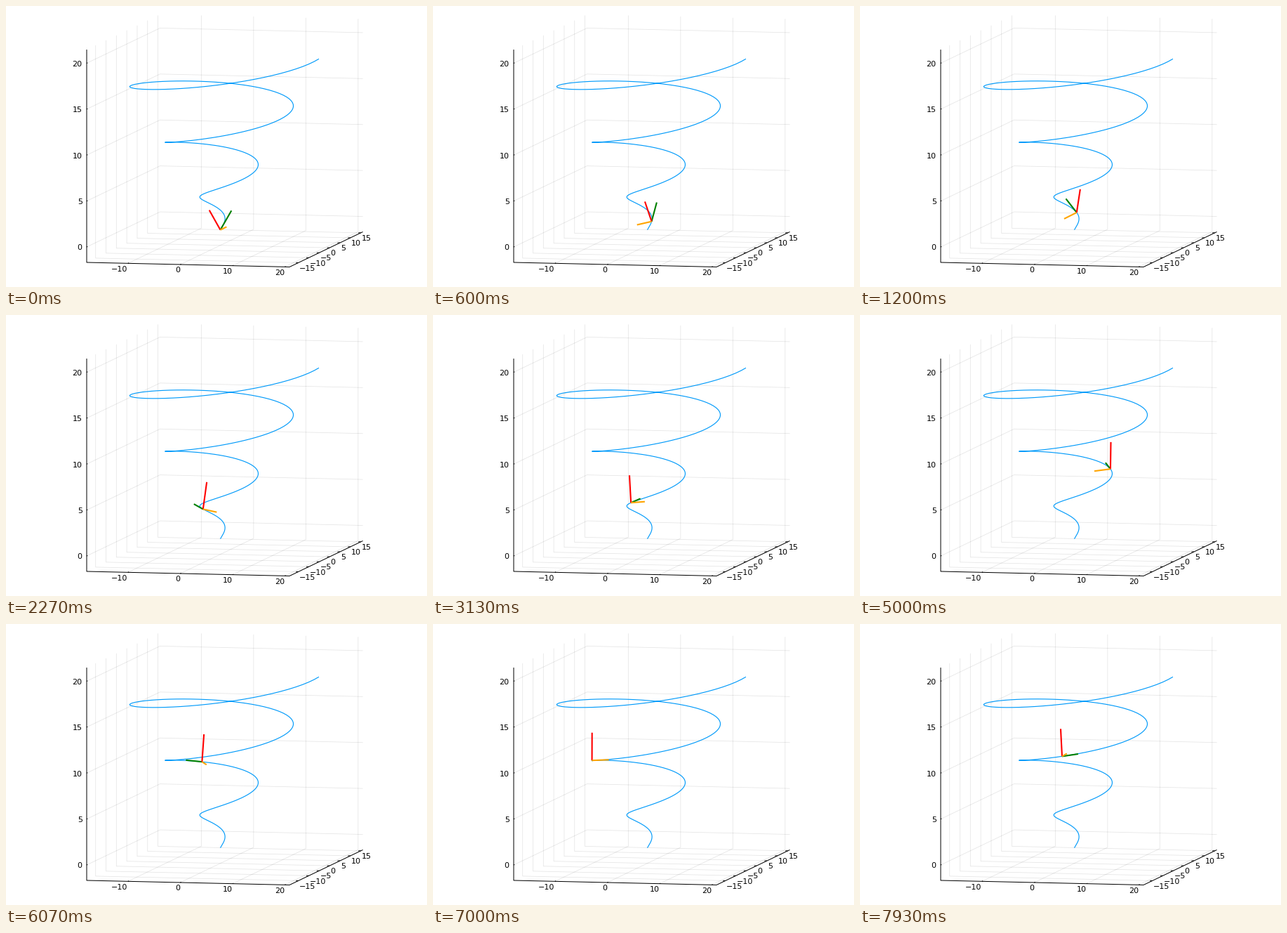
A matplotlib script that plays this animation: 600 by 400 pixels, repeating every 8 s.

```python
import numpy as np
import matplotlib.pyplot as plt
from matplotlib.animation import FuncAnimation

FRAMES, LOOP_MS = 120, 8000
PX = 0.72  # points per pixel at 100 dpi
X0, X1 = -17.9, 20.9
Y0, Y1 = -19.3, 16.0
Z0, Z1 = -1.68, 21.48
TS = np.linspace(0, 6 * np.pi, 200)
ARROW = 3

plt.rcParams["font.family"] = "DejaVu Sans"
fig = plt.figure(figsize=(6, 4), dpi=100, facecolor="white")
ax = fig.add_axes([0, 0, 1, 1])
ax.set_xlim(0, 600)
ax.set_ylim(400, 0)
ax.axis("off")


def project(x, y, z):
    """Orthographic view: box coordinates to stage pixels."""
    u, v, w = x - X0, y - Y0, z - Z0
    return (115 + 7.45 * u + 2.96 * v,
            365 + 0.167 * u - 1.416 * v - 13.08 * w)


def segment(points, color="black", width=1.0, **kw):
    xs, ys = project(*np.array(points, float).T)
    return ax.plot(xs, ys, color=color, lw=width * PX,
                   solid_capstyle="butt", **kw)[0]


def grid(*points):
    segment(points, width=0.8, alpha=0.1, zorder=1)


def label(point, value, dx, dy, ha):
    px, py = project(*point)
    ax.text(px + dx, py + dy, str(value).replace("-", "\u2212"),
            fontsize=8, ha=ha, va="center_baseline")


def draw_box():
    tick_y = Y0 + 0.012 * (Y1 - Y0)
    tick_x = X1 - 0.012 * (X1 - X0)
    for x in range(-10, 21, 10):
        grid((x, Y0, Z0), (x, Y1, Z0), (x, Y1, Z1))
        segment([(x, Y0, Z0), (x, tick_y, Z0)])
        label((x, Y0, Z0), x, -0.2, 7.4, "right")
    for y in range(-15, 16, 5):
        grid((X1, y, Z0), (X0, y, Z0), (X0, y, Z1))
        segment([(X1, y, Z0), (tick_x, y, Z0)])
        label((X1, y, Z0), y, 1.5, 7.2, "left")
    for z in range(0, 21, 5):
        grid((X0, Y0, z), (X0, Y1, z), (X1, Y1, z))
        segment([(X0, Y0, z), (X0, tick_y, z)])
        label((X0, Y0, z), z, -6.3, 0.3, "right")
    segment([(X0, Y0, Z1), (X0, Y0, Z0), (X1, Y0, Z0), (X1, Y1, Z0)])


def helix(t):
    return np.array([t * np.cos(t), t * np.sin(t), t])


def frenet(t):
    """Unit tangent, binormal and normal of the conical helix."""
    c, s = np.cos(t), np.sin(t)
    d1 = np.array([c - t * s, s + t * c, 1])
    d2 = np.array([-2 * s - t * c, 2 * c - t * s, 0])
    tangent = d1 / np.linalg.norm(d1)
    binormal = np.cross(d1, d2)
    binormal /= np.linalg.norm(binormal)
    return tangent, binormal, np.cross(binormal, tangent)


draw_box()
segment(helix(TS).T, color="#009afa", width=1.15, zorder=3)
arrows = [segment([(0, 0, 0), (0, 0, 1)], color=c, width=2.1, zorder=4)
          for c in ("green", "red", "orange")]


def update(i):
    t = TS[i]
    base = helix(t)
    for line, vec in zip(arrows, frenet(t)):
        line.set_data(*project(*np.array([base, base + ARROW * vec]).T))
    return arrows


anim = FuncAnimation(fig, update, frames=FRAMES, interval=LOOP_MS / FRAMES,
                     init_func=lambda: update(0), repeat=True, repeat_delay=0)
plt.show()
```
